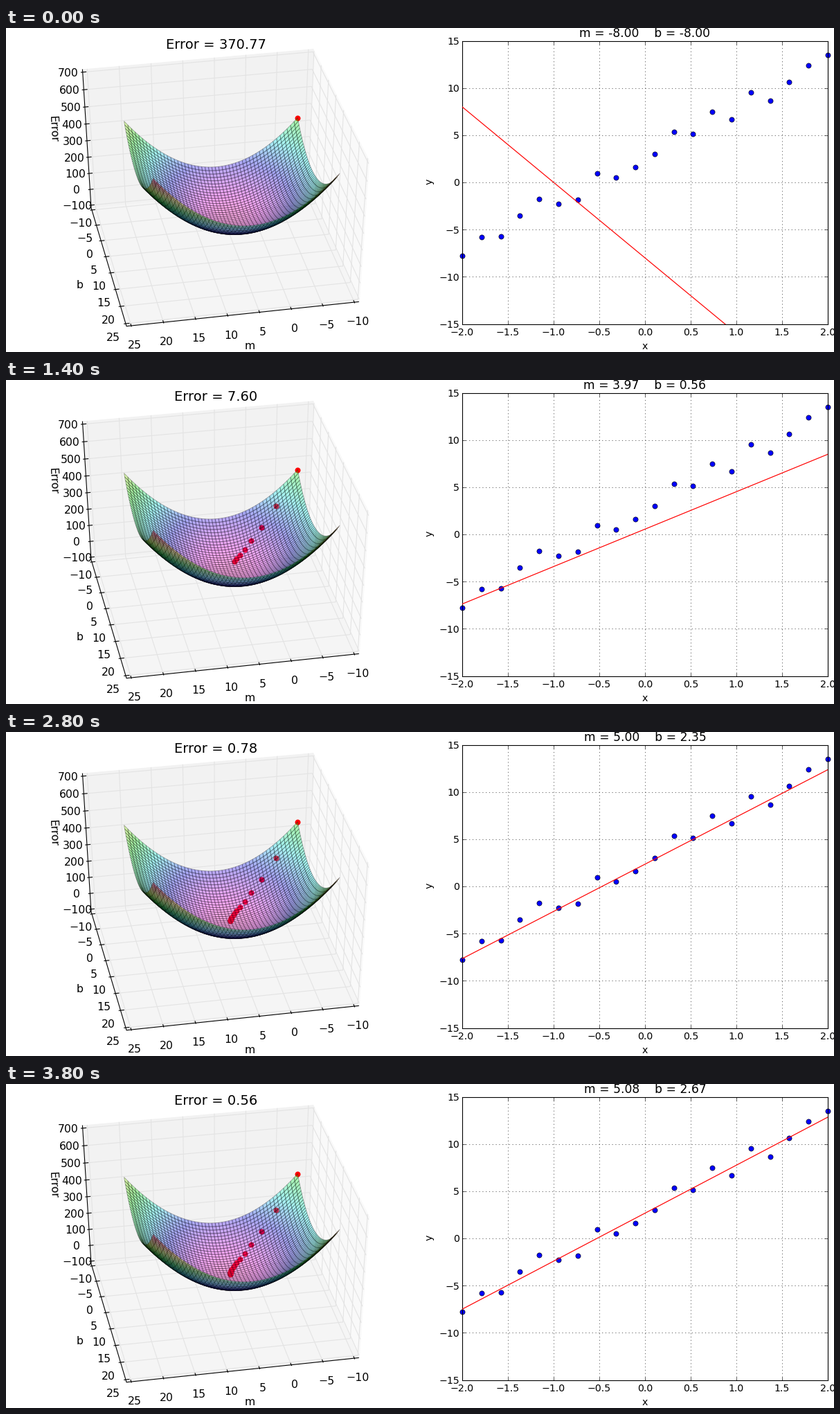
A matplotlib script that plays this animation: 1196 px wide and 468 px high, repeating every 4000 ms.

```python
import numpy as np
import matplotlib as mpl
import matplotlib.pyplot as plt
from matplotlib.animation import FuncAnimation
from matplotlib.collections import LineCollection, PolyCollection

W, H, DPI = 1196, 468, 64
PT = 72 / DPI  # points per pixel
FRAMES = 20

mpl.rcParams["font.family"] = "DejaVu Sans"

# Sample points and their least-squares fit
xs = np.linspace(-2, 2, 20)
ys = [-7.81, -5.83, -5.72, -3.52, -1.76, -2.27, -1.83, 0.92, 0.48, 1.65,
      3.01, 5.39, 5.10, 7.45, 6.64, 9.50, 8.66, 10.64, 12.40, 13.46]
M_FIT, B_FIT, E_MIN = 5.1022, 2.8284, 0.534
VAR = np.mean(xs ** 2)
RATE, START = 0.1, -8.0


def error(m, b):
    return VAR * (m - M_FIT) ** 2 + (b - B_FIT) ** 2 + E_MIN


# Gradient descent in closed form
step = np.arange(FRAMES)
ms = M_FIT + (START - M_FIT) * (1 - 2 * RATE * VAR) ** step
bs = B_FIT + (START - B_FIT) * (1 - 2 * RATE) ** step
errs = error(ms, bs)

# Camera: the box spans -1..1 on each axis
ELEV, AZIM = np.radians(40), np.radians(79)
SE, CE, SA, CA = np.sin(ELEV), np.cos(ELEV), np.sin(AZIM), np.cos(AZIM)
DIST = 19.2


def view(x, y, z):
    depth = DIST - (CE * CA * x + CE * SA * y + SE * z)
    px = 310.5 + 3270 * (CA * y - SA * x) / depth
    py = 227.8 - 2530 * (CE * z - SE * CA * x - SE * SA * y) / depth
    return px, py, depth


def flat(v):
    return (v - 7.5) / (17.5 * 25 / 24)


def tall(v):
    return (v - 300) / (400 * 25 / 24)


def path(*pts):
    return [view(*p)[:2] for p in pts]


fig = plt.figure(figsize=(W / DPI, H / DPI), dpi=DPI, facecolor="white")
stage = fig.add_axes([0, 0, 1, 1])
stage.set_xlim(0, W)
stage.set_ylim(H, 0)
stage.axis("off")


def label(x, y, s, size):
    return stage.text(x, y + 0.365 * size, s, fontsize=size * PT,
                      ha="center", va="baseline")


def num(v):
    return str(v).replace("-", "\u2212")


# Panes
panes = [
    ([(-1, -1, -1), (-1, 1, -1), (-1, 1, 1), (-1, -1, 1)], 0.975),
    ([(-1, -1, -1), (1, -1, -1), (1, -1, 1), (-1, -1, 1)], 0.95),
    ([(-1, -1, -1), (1, -1, -1), (1, 1, -1), (-1, 1, -1)], 0.9625),
]
for corners, g in panes:
    stage.add_collection(PolyCollection([path(*corners)], facecolors=str(g),
                                        edgecolors=str(g), linewidths=PT, zorder=0))

# Grid, ticks and tick labels
OUT, IN = 1.016, 0.968
grid, marks = [], []
for v in range(-10, 30, 5):
    f = flat(v)
    grid.append(path((f, 1, -1), (f, -1, -1), (f, -1, 1)))
    grid.append(path((1, f, -1), (-1, f, -1), (-1, f, 1)))
    marks.append(path((f, OUT, -1), (f, IN, -1)))
    marks.append(path((OUT, f, -1), (IN, f, -1)))
    label(*view(f, 1.147, -1.147)[:2], num(v), 15.8)
    label(*view(1.11, f, -1.18)[:2], num(v), 15.8)
for v in range(-100, 800, 100):
    f = tall(v)
    grid.append(path((1, -1, f), (-1, -1, f), (-1, 1, f)))
    marks.append(path((OUT, -1, f), (IN, -1, f)))
    label(*view(1.12, -1.022, f)[:2], num(v), 15.8)
marks.append(path((1, -1, 1), (1, -1, -1), (1, 1, -1), (-1, 1, -1)))
stage.add_collection(LineCollection(grid, colors="0.89", linewidths=1.1 * PT, zorder=1))
stage.add_collection(LineCollection(marks, colors="black", linewidths=1.1 * PT, zorder=2))

label(352, 458.7, "m", 15.8)
label(107, 370, "b", 15.8)
stage.text(68, 146, "Error", fontsize=15.8 * PT, rotation=-87,
           rotation_mode="anchor", ha="center", va="center")

# Error surface, painted from back to front
N = 50
side = np.linspace(-8, 20, N + 1)
gm, gb = np.meshgrid(side, side)
gz = error(gm, gb)
px, py, depth = view(flat(gm), flat(gb), tall(gz))


def cells(a):
    quad = [a[:-1, :-1], a[:-1, 1:], a[1:, 1:], a[1:, :-1]]
    return np.stack(quad, axis=-1).reshape(-1, 4)


quads = np.stack([cells(px), cells(py)], axis=-1)
height = cells(gz).mean(axis=1)
shade = (height - height.min()) / np.ptp(height)
order = np.argsort(-cells(depth).mean(axis=1))
stage.add_collection(PolyCollection(
    quads[order], facecolors=mpl.colormaps["gist_rainbow_r"](shade[order], alpha=0.3),
    edgecolors=(0, 0, 0, 0.3), linewidths=0.9 * PT, zorder=4))

dot_x, dot_y, _ = view(flat(ms), flat(bs), tall(errs))
dots, = stage.plot([], [], "o", color="red", ms=8 * PT, mew=0, zorder=3)
err_text = label(303.5, 23, "", 19.5)

# Line fit
ax = fig.add_axes([659 / W, 1 - 427.5 / H, 528 / W, 409 / H])
ax.set_xlim(-2, 2)
ax.set_ylim(-15, 15)
ax.set_xticks(np.arange(-2, 2.1, 0.5))
ax.set_yticks(range(-15, 16, 5))
ax.xaxis.set_major_formatter(lambda v, _: num(f"{v:.1f}"))
ax.tick_params(direction="in", top=True, right=True, length=4.7 * PT,
               width=0.6 * PT, labelsize=14.1 * PT)
ax.tick_params(axis="x", pad=5 * PT)
ax.tick_params(axis="y", pad=4 * PT)
ax.set_axisbelow(True)
ax.grid(color="black", lw=0.6 * PT, ls=(0, (2, 6)))
for spine in ax.spines.values():
    spine.set_linewidth(1.1 * PT)
ax.plot(xs, ys, "o", color="blue", ms=7.2 * PT, mec="black", mew=0.6 * PT,
        clip_on=False, zorder=2.5)
fit, = ax.plot([], [], color="red", lw=1.2 * PT, zorder=3)
fit_text = label(923, 7, "", 17.1)
label(923, 458.7, "x", 14.1)
stage.text(612, 222, "y", fontsize=14.1 * PT, rotation=90, ha="center", va="center")

ends = np.array([-2, 2])


def update(k):
    dots.set_data(dot_x[:k + 1], dot_y[:k + 1])
    fit.set_data(ends, ms[k] * ends + bs[k])
    err_text.set_text(f"Error = {errs[k]:.2f}")
    fit_text.set_text(f"m = {ms[k]:.2f}    b = {bs[k]:.2f}")
    return dots, fit, err_text, fit_text


anim = FuncAnimation(fig, update, frames=FRAMES, interval=200, repeat=True)
plt.show()
```
